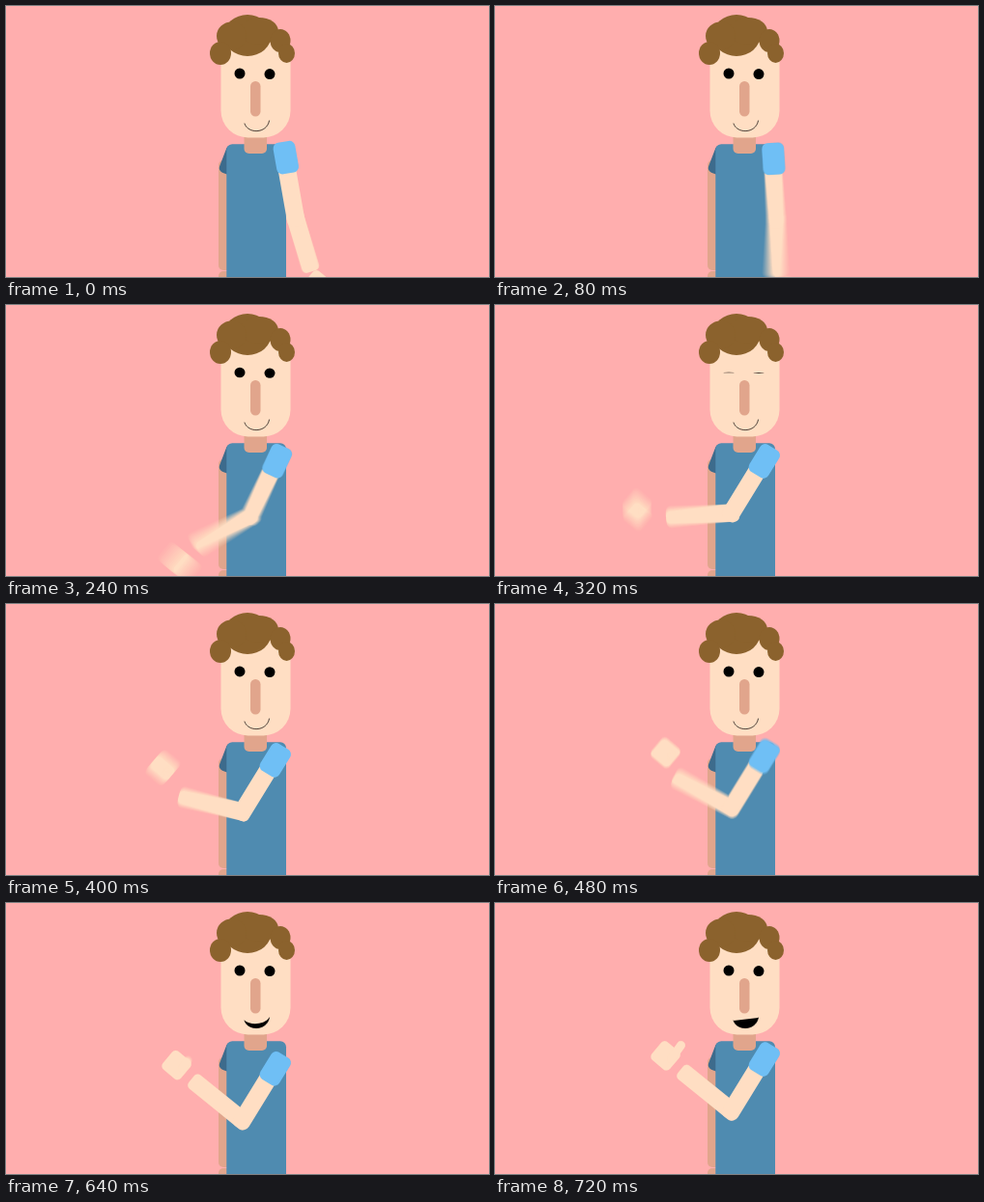
An HTML page with a canvas for the animation above (960 ms loop, 500x281 px).

```html
<!DOCTYPE html>
<html lang="en">
<head>
<meta charset="utf-8">
<title>Thumbs up</title>
<style>
  html, body { margin: 0; width: 100%; height: 100%; overflow: hidden; background: #ffaeae; }
  canvas { display: block; width: 500px; height: 281px; }
</style>
</head>
<body>
<canvas id="stage" width="500" height="281"></canvas>
<script>
const W = 500, H = 281, LOOP = 960, STEP = 40, SHUTTER = 24, SAMPLES = 12;
const SKIN = '#ffdec3', SHADE = '#e1a58c', HAIR = '#8b622d';
const SHIRT = '#4f8bb0', SLEEVE = '#6fbff5', BACK_SLEEVE = '#3d6b8c';
const RAD = Math.PI / 180;

const out = document.getElementById('stage').getContext('2d');
const scratch = document.createElement('canvas');
scratch.width = W;
scratch.height = H;
const g = scratch.getContext('2d');

const mix = (a, b, u) => a + (b - a) * u;
const progress = (t, from, to) => Math.min(1, Math.max(0, (t - from) / (to - from)));
const ease = (t, from, to) => {
  const u = progress(t, from, to);
  return u * u * (3 - 2 * u);
};
// Smooth rise and fall, 0 at both ends and 1 in the middle.
const pulse = (t, from, to) => Math.sin(Math.PI * progress(t, from, to)) ** 2;

function armPose(t) {
  const raise = ease(t, 0, 320), swing = ease(t, 0, 480);
  const bend = (ease(t, 0, 560) + progress(t, 0, 560)) / 2;
  const shoulder = mix(-10, 31.5, raise);
  return {
    shoulder,
    forearm: shoulder + mix(-7, 97.5, bend),
    length: mix(58, 68, raise),
    hand: mix(-18, 130, swing) * RAD,
    reach: mix(73, 89, swing) + 13 * pulse(t, 160, 480),
    lift: 10 * pulse(t, 560, 720) - 8 * pulse(t, 440, 600),
    thumb: ease(t, 560, 720)
  };
}

function box(color, x, y, w, h, r) {
  g.fillStyle = color;
  g.beginPath();
  g.roundRect(x, y, w, h, r);
  g.fill();
}

function oval(color, x, y, rx, ry) {
  g.fillStyle = color;
  g.beginPath();
  g.ellipse(x, y, rx, ry, 0, 0, 2 * Math.PI);
  g.fill();
}

function placed(x, y, degrees, draw) {
  g.save();
  g.translate(x, y);
  g.rotate(degrees * RAD);
  draw();
  g.restore();
}

function drawBody() {
  g.fillStyle = '#ffaeae';
  g.fillRect(0, 0, W, H);
  box(SHADE, 220, 160, 18, 114, 5);
  box(SHADE, 220, 275, 18, 20, 5);
  placed(234, 160.5, 21, () => box(BACK_SLEEVE, -10, -15, 20, 30, 5));
  box(SHIRT, 228.3, 143.2, 61.7, 150, 6);
  box(SHADE, 246.5, 125, 23.5, 28, 5);
}

function drawHead(t) {
  box(SKIN, 222.5, 36, 72, 100.5, [10, 10, 28, 28]);
  oval(HAIR, 250, 30.5, 24.5, 21.5);
  oval(HAIR, 262, 26, 20, 14);
  oval(HAIR, 233.5, 31, 15.5, 14.5);
  oval(HAIR, 222, 49, 11, 12);
  oval(HAIR, 284, 36, 10.5, 12);
  oval(HAIR, 290.5, 49, 8.5, 10);

  const ry = Math.max(0.35, 5.5 * (1 - pulse(t, 225, 405)));
  oval('#000', 242, 70, 5.5, ry);
  oval('#000', 273, 70.6, 5.5, ry);
  box(SHADE, 253, 78, 10.5, 36.5, 5.2);

  // The upper lip flattens from the smile curve to a straight chord.
  const open = ease(t, 560, 720);
  g.fillStyle = g.strokeStyle = '#000';
  g.lineWidth = 0.7;
  g.beginPath();
  g.moveTo(247, 122);
  g.bezierCurveTo(250, 132.5, 270, 133, 272.5, 119);
  g.stroke();
  g.bezierCurveTo(mix(270, 264, open), mix(133, 120, open),
    mix(250, 255.5, open), mix(132.5, 121, open), 247, 122);
  g.fill();
}

function drawArm(t) {
  const p = armPose(t);
  const c = Math.cos(p.shoulder * RAD), s = Math.sin(p.shoulder * RAD);
  const x = 278, y = 145 + p.lift;
  const elbowX = x + 8.5 * c - 77.5 * s, elbowY = y + 8.5 * s + 77.5 * c;
  const handX = elbowX - p.reach * Math.sin(p.hand);
  const handY = elbowY + p.reach * Math.cos(p.hand);

  placed(elbowX, elbowY, p.forearm, () => box(SKIN, -9.25, -8, 18.5, p.length + 8, 5));
  placed(x, y, p.shoulder, () => {
    box(SKIN, -0.75, 15, 18.5, 71.5, [0, 0, 7, 7]);
    box(SLEEVE, -2, -2.5, 23, 33, 6);
  });
  placed(handX, handY, 40, () => box(SKIN, -12.3, -12.3, 24.6, 24.6, 5));
  g.strokeStyle = SKIN;
  g.lineWidth = 9;
  g.lineCap = 'round';
  g.beginPath();
  g.moveTo(handX + 6, handY + 3);
  g.lineTo(handX + 6 + 10 * p.thumb, handY + 3 - 14 * p.thumb);
  g.stroke();
}

// Motion blur: running average of arm poses across the shutter.
function render(t) {
  for (let i = 0; i < SAMPLES; i++) {
    drawBody();
    drawHead(t);
    drawArm(t + SHUTTER * ((i + 0.5) / SAMPLES - 0.5));
    out.globalAlpha = 1 / (i + 1);
    out.drawImage(scratch, 0, 0);
  }
}

let shown = -1;
function tick() {
  const step = Math.floor(performance.now() % LOOP / STEP);
  if (step !== shown) render(step * STEP);
  shown = step;
  requestAnimationFrame(tick);
}
tick();
</script>
</body>
</html>
```
